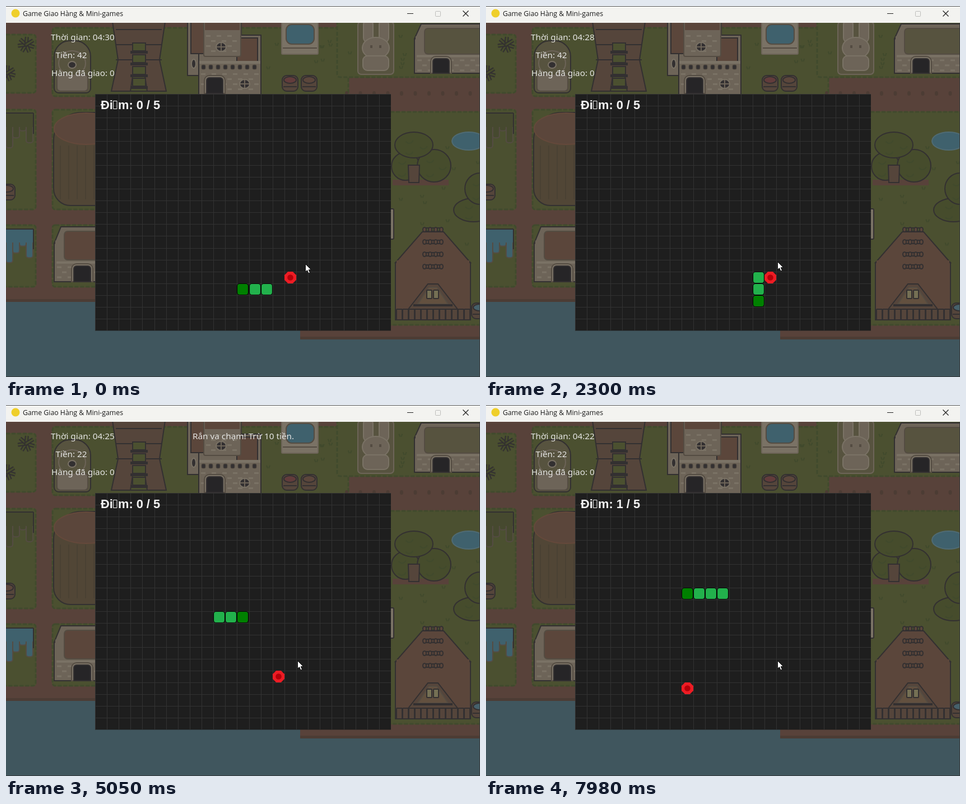
These frames come from a looping animation (846x662 px, 8 s). An HTML page with a canvas:

```html
<!DOCTYPE html>
<html lang="vi">
<head>
<meta charset="utf-8">
<title>Game Giao Hàng &amp; Mini-games</title>
<style>
html, body { margin: 0; width: 100%; height: 100%; overflow: hidden; background: #40565e; }
canvas { display: block; }
</style>
</head>
<body>
<canvas id="stage" width="846" height="662"></canvas>
<script>
const W = 846, H = 662, LOOP = 8000, STEP = 96, CELL = 21.12, LEFT = 159, TOP = 157;
const COLS = 25, ROWS = 20;
const stage = document.getElementById('stage').getContext('2d');
const scenery = document.createElement('canvas');
scenery.width = W;
scenery.height = H;
let g = scenery.getContext('2d');

const C = {
  grass: '#4b5030', tuft: '#414a2d', dirt: '#58423a', water: '#40565e', pond: '#3f616d',
  ink: '#333031', stone: '#6d6458', pale: '#7a7265', shade: '#544c42',
  roof: '#5b463b', wood: '#55453b', leaf: '#464c2c', moss: '#57533f', stump: '#514636'
};

// ---- drawing helpers ----
function paint(fill, line, width = 2) {
  if (fill) { g.fillStyle = fill; g.fill(); }
  if (line) { g.strokeStyle = line; g.lineWidth = width; g.stroke(); }
}
function rect(color, x, y, w, h) {
  g.fillStyle = color;
  g.fillRect(x, y, w, h);
}
function box(fill, x, y, w, h, r = 0, line = C.ink, width) {
  g.beginPath();
  g.roundRect(x, y, w, h, r);
  paint(fill, line, width);
}
function poly(fill, points, line = C.ink, width) {
  g.beginPath();
  for (const [x, y] of points) g.lineTo(x, y);
  g.closePath();
  paint(fill, line, width);
}
// Upright shape, symmetric about cx: w1 wide at y1, w2 wide at y2.
function taper(fill, cx, y1, w1, y2, w2, line) {
  poly(fill, [[cx - w1 / 2, y1], [cx + w1 / 2, y1], [cx + w2 / 2, y2], [cx - w2 / 2, y2]], line);
}
function oval(fill, x, y, rx, ry, line = C.ink, width) {
  g.beginPath();
  g.ellipse(x, y, rx, ry, 0, 0, 7);
  paint(fill, line, width);
}
function seg(color, x1, y1, x2, y2, width = 2) {
  g.beginPath();
  g.moveTo(x1, y1);
  g.lineTo(x2, y2);
  paint(null, color, width);
}
function text(str, x, y, font, color) {
  g.font = font;
  g.fillStyle = color;
  g.fillText(str, x, y);
}

// ---- scenery parts ----
function lawn(x, y, w, h) {
  box(C.grass, x, y, w, h, 5, null);
  g.setLineDash([7, 3]);
  box(null, x + 1, y + 1, w - 2, h - 2, 5, C.tuft, 3);
  g.setLineDash([]);
}
function bricks(x, y, w, h) {
  for (let row = 0; row * 9 < h - 5; row++)
    for (let i = row % 2 * 9; i < w - 8; i += 19) rect(C.pale, x + i, y + row * 9, 8, 3);
}
function door(x, y, w, h) {
  box(C.pale, x - 4, y - 4, w + 8, h + 4, [9, 9, 0, 0], C.shade);
  box('#262527', x, y, w, h, [5, 5, 0, 0]);
}
function porthole(x, y) {
  oval(C.ink, x, y, 9, 8, C.pale);
  seg(C.stone, x - 8, y, x + 8, y);
  seg(C.stone, x, y - 7, x, y + 7);
}
function cottage(x, y, w, h, roof) {
  taper(C.stone, x + w / 2, y, w - 24, y + h * 0.3, w);
  box(C.stone, x, y + h * 0.3, w, h * 0.7);
  rect(C.stone, x + 2, y + h * 0.25, w - 4, 12);
  box(roof, x + 18, y + 8, w - 36, h * 0.52, 6, C.shade);
  rect(C.pale, x + 4, y + h * 0.63, w - 8, 4);
  bricks(x + 5, y + h * 0.72, w - 8, h * 0.28);
}
function barrel(x, y, lid) {
  box(C.wood, x, y, 28, 28, 8);
  oval(lid, x + 14, y + 8, 11, 6);
  seg(C.ink, x + 2, y + 20, x + 26, y + 20);
}
function palm(x, y) {
  for (let a = 0.3; a < 6; a += 0.9) {
    const tx = x + Math.cos(a) * 15, ty = y + Math.sin(a) * 14;
    seg(C.ink, x, y, tx, ty, 7);
    seg(C.leaf, x, y, tx, ty, 3);
  }
}
function crown(x, y, rx, ry) {
  oval(C.leaf, x, y, rx, ry);
  for (let a = 0; a < 6; a += 2.1) {
    g.beginPath();
    g.arc(x + Math.cos(a) * rx / 2, y + Math.sin(a) * ry / 2, 7, 0.3, 2.6);
    paint(null, C.tuft);
  }
}
function tree(x, y) {
  rect(C.dirt, x - 38, y + 62, 100, 10);
  crown(x - 15, y + 38, 25, 25);
  crown(x + 36, y + 37, 30, 29);
  crown(x, y, 34, 23);
  taper(C.wood, x, y + 36, 20, y + 67, 18);
}
function drape(color, y, h) {
  for (let x = 0; x < 48; x += 12) box(color, x, y, 12, h * (0.75 + 0.25 * Math.cos(x / 7)), [0, 0, 4, 4], C.shade);
  rect(color, 0, y, 48, h * 0.4);
  seg(C.ink, 0, y, 49, y);
  seg(C.ink, 49, y, 49, y + h * 0.6);
}

function drawGround() {
  rect(C.dirt, 0, 30, W, H);
  for (const [y, h] of [[50, 106], [184, 180], [390, 112]]) {
    lawn(-6, y, 60, h);
    lawn(82, y, 300, h);
  }
  lawn(82, 38, 530, 124);
  lawn(590, 24, 270, 104);
  lawn(610, 188, 250, 382);
  let seed = 7;
  const rnd = () => (seed = seed * 16807 % 2147483647) / 2147483647;
  for (let i = 0; i < 46; i++) {
    const high = i < 26;
    const x = high ? 465 + rnd() * 260 : 690 + rnd() * 150;
    const y = high ? 48 + rnd() * 65 : 200 + rnd() * 350;
    seg(C.tuft, x, y, x + 2, y + 5);
    seg(C.tuft, x + 6, y, x + 4, y + 5);
  }
  for (let x = 608; x < W; x += 24.5) oval('#4c3c34', x, 156, 3, 4, null);
  rect(C.water, 0, 528, 525, 134);
  rect(C.water, 525, 595, 321, 67);
  rect('#4c3c34', 0, 523, 159, 5);
  rect('#4c3c34', 525, 590, 321, 5);
}

function drawLeft() {
  palm(36, 69);
  palm(2, 120);
  box(C.moss, 86, 62, 65, 93, [28, 28, 8, 8]);
  box(C.stone, 91, 122, 55, 30, 6, C.shade);
  oval(C.moss, 118, 102, 24, 22, C.stone);
  oval(C.ink, 118, 105, 7, 6, C.pale);

  drape('#46492f', 191, 62);
  barrel(-12, 318, C.roof);
  box(C.stump, 85, 190, 120, 166, [50, 0, 0, 30]);
  oval(C.roof, 143, 219, 57, 28, '#65493b');
  for (let x = 97; x < 159; x += 15) seg('#4a4133', x, 249, x, 345);
  drape(C.pond, 398, 60);
  cottage(86, 394, 130, 98, C.roof);
  door(121, 464, 30, 28);
}

function drawTower() {
  taper(C.wood, 237, 28, 94, 96, 74);
  taper(C.wood, 237, 96, 74, 152, 98);
  taper(C.grass, 237, 112, 18, 152, 30);
  for (let y = 42; y < 100; y += 27) seg(C.ink, 196, y, 278, y);
  for (let y = 66; y < 150; y += 21) {
    box(C.grass, 226, y, 23, 14);
    rect(C.ink, 222, y + 14, 31, 5);
  }
}

function drawHall() {
  box(C.stone, 324, 26, 96, 98);
  box(C.stone, 344, 52, 111, 108);
  box(C.roof, 330, 26, 24, 59);
  box(C.roof, 412, 57, 37, 42);
  box(C.stone, 353, 26, 66, 64, 3, C.shade);
  rect(C.roof, 355, 30, 62, 13);
  bricks(357, 52, 56, 36);
  porthole(384, 73);
  oval(C.ink, 335, 103, 4, 8, C.pale);
  rect(C.pale, 345, 98, 109, 5);
  for (let x = 349; x < 450; x += 13) box(C.ink, x, 105, 7, 8, 2, C.shade, 1);
  bricks(348, 120, 104, 36);
  door(358, 128, 29, 28);
  porthole(426, 139);
}

function drawTop() {
  drawTower();
  drawHall();
  box(C.pale, 492, 26, 65, 60, 2, C.stone);
  box(C.pond, 500, 33, 50, 35, 10, C.shade);
  seg(C.shade, 494, 75, 555, 75);
  barrel(493, 124, '#623c3b');
  barrel(527, 124, C.roof);

  box(C.moss, 628, 28, 64, 94, 6, C.stone);
  for (const side of [-1, 1]) box(C.stone, 652 + side * 14, 25, 17, 40, 8, C.pale);
  oval(C.stone, 660, 75, 24, 19, C.pale);
  box(C.stone, 637, 89, 46, 26, 8, C.pale);
  for (const side of [-1, 1]) rect(C.shade, 658 + side * 8, 70, 4, 5);

  cottage(729, 32, 160, 88, C.moss);
  door(762, 94, 29, 26);
}

function drawRight() {
  tree(728, 248);
  oval(C.pond, 826, 241, 30, 16, '#506b73');
  crown(835, 364, 36, 21);
  crown(846, 326, 27, 28);
  box(C.pale, 684, 362, 8, 54, 2);

  const cx = 762;
  box(C.roof, 695, 458, 134, 102);
  taper(C.roof, cx, 403, 38, 458, 134);
  rect(C.roof, 697, 454, 130, 8);
  for (let y = 399; y < 470; y += 22) {
    for (const d of [-3, 3]) seg(C.ink, 744, y + d, 780, y + d);
    for (let x = 747; x < 780; x += 10) oval(C.roof, x, y, 3, 4);
  }
  for (let x = 697; x < 822; x += 11) box(C.wood, x, 541, 10, 19, 1);
  taper(C.wood, cx, 496, 18, 541, 88);
  taper('#62503f', cx, 502, 14, 532, 54, C.shade);
  for (const side of [-1, 1]) box('#757054', 757 + side * 6, 507, 9, 15, 1);
  seg(C.ink, 727, 534, 797, 534, 4);
  barrel(831, 530, '#46616b');
}

function drawWindow() {
  rect('#f3f3f0', 0, 0, W, 30);
  rect('#56585a', 0, 0, W, 1);
  rect('#35383a', 0, 661, W, 1);
  rect('#35383a', 845, 30, 1, 632);
  oval('#efcf2b', 17, 13, 7.5, 7.5, null);
  text('Game Giao Hàng & Mini-games', 30, 18, '12.3px "Open Sans", sans-serif', '#1b1b1b');
  rect('#222', 716, 13, 11, 1);
  box(null, 766.5, 9.5, 9, 9, 1, '#bdbdbb', 1);
  seg('#222', 815.5, 8.5, 825.5, 18.5, 1.2);
  seg('#222', 825.5, 8.5, 815.5, 18.5, 1.2);
}

const gx = col => Math.round(LEFT + col * CELL);
const gy = row => Math.round(TOP + row * CELL);

function drawBoard() {
  rect('#1e1e1e', LEFT, TOP, COLS * CELL, ROWS * CELL);
  for (let i = 0; i < COLS; i++) rect('#323232', gx(i), TOP, 1, ROWS * CELL);
  for (let i = 0; i < ROWS; i++) rect('#323232', LEFT, gy(i), COLS * CELL, 1);
}

drawGround();
drawLeft();
drawTop();
drawRight();
drawBoard();
drawWindow();
g = stage;

// ---- game ----
const DIRS = { L: [-1, 0], R: [1, 0], U: [0, -1], D: [0, 1] };
function walk(x, y, legs) {
  const cells = [[x, y]];
  for (const leg of legs.split(' ')) {
    const [dx, dy] = DIRS[leg[0]];
    for (let i = +leg.slice(1); i > 0; i--) cells.push([x += dx, y += dy]);
  }
  return cells;
}
// Each life ends in a crash; the head starts on the third cell of its path.
const lives = [
  { start: -36, path: walk(14, 16, 'L9 U3 R10 D6'), food: [16, 15] },
  { start: 2556, path: walk(10, 10, 'R9 D7 L8 D2'), food: [11, 19], next: [15, 15] },
  { start: 4956, path: walk(10, 10, 'R10 D5 L6 U7 L5'), food: [15, 15], next: [9, 16] }
];

function ease(t, from, to) {
  const p = Math.min(1, Math.max(0, (t - from) / (to - from)));
  return p * p * (3 - 2 * p);
}

function drawCell([col, row], color) {
  box(color, gx(col) + 0.5, gy(row) + 0.5, 20, 20, 4.5, '#050805', 1.2);
}
function drawFood([col, row]) {
  const x = gx(col) + 10.5, y = gy(row) + 10.5, corners = [];
  for (let a = Math.PI / 8; a < 6.2; a += Math.PI / 4)
    corners.push([x + 11.4 * Math.cos(a), y + 11.4 * Math.sin(a)]);
  poly('#ed1c24', corners, null);
  oval('#b50009', x, y, 5.3, 5.3, null);
}
function drawCursor(t) {
  const a = ease(t, 150, 1000), b = ease(t, 1460, 2100);
  g.save();
  g.translate(534.5 - 30 * a + 16 * b, 460.5 - 8 * a + 4 * b);
  poly('#fff', [[0, 0], [0, 14], [3, 11], [5.5, 16.5], [8, 15.3], [5.7, 10.3], [10, 10]], '#111', 1);
  g.restore();
}

function draw(t) {
  const index = lives.findLastIndex(l => t >= l.start);
  const { start, path, food, next } = lives[index];
  const head = Math.min(2 + Math.floor((t - start) / STEP), path.length - 1);
  const meal = path.findIndex(cell => '' + cell === '' + food);
  const score = meal >= 0 && head >= meal ? 1 : 0;
  const secs = 30 - Math.floor((t + 435) / 1000);
  const hud = '15.3px "Noto Sans", sans-serif', bold = 'bold 21.8px "Liberation Sans", Arial, sans-serif';
  const write = (str, x, y) => text(str, x, y, hud, '#e6e6e4');

  g.drawImage(scenery, 0, 0);
  write('Thời gian: 04:' + secs, 80, 61);
  write('Tiền: ' + (42 - 10 * index), 88.5, 93);
  write('Hàng đã giao: 0', 81, 125);
  if (index && t < start + 2000) write('Rắn va chạm! Trừ 10 tiền.', 333, 61);

  drawFood(score ? next : food);
  for (let i = head - 2 - score; i <= head; i++)
    drawCell(path[i], i === head ? '#008000' : '#22b14c');

  text('Đi', 169, 184, bold, '#f4f4f4');
  box(null, 191.5, 169.5, 6.5, 14, 0, '#f4f4f4', 1);
  text('m: ' + score + ' / 5', 200, 184, bold, '#f4f4f4');
  drawCursor(t);
}

function frame(now) {
  draw(now % LOOP);
  requestAnimationFrame(frame);
}
frame(0);
</script>
</body>
</html>
```
